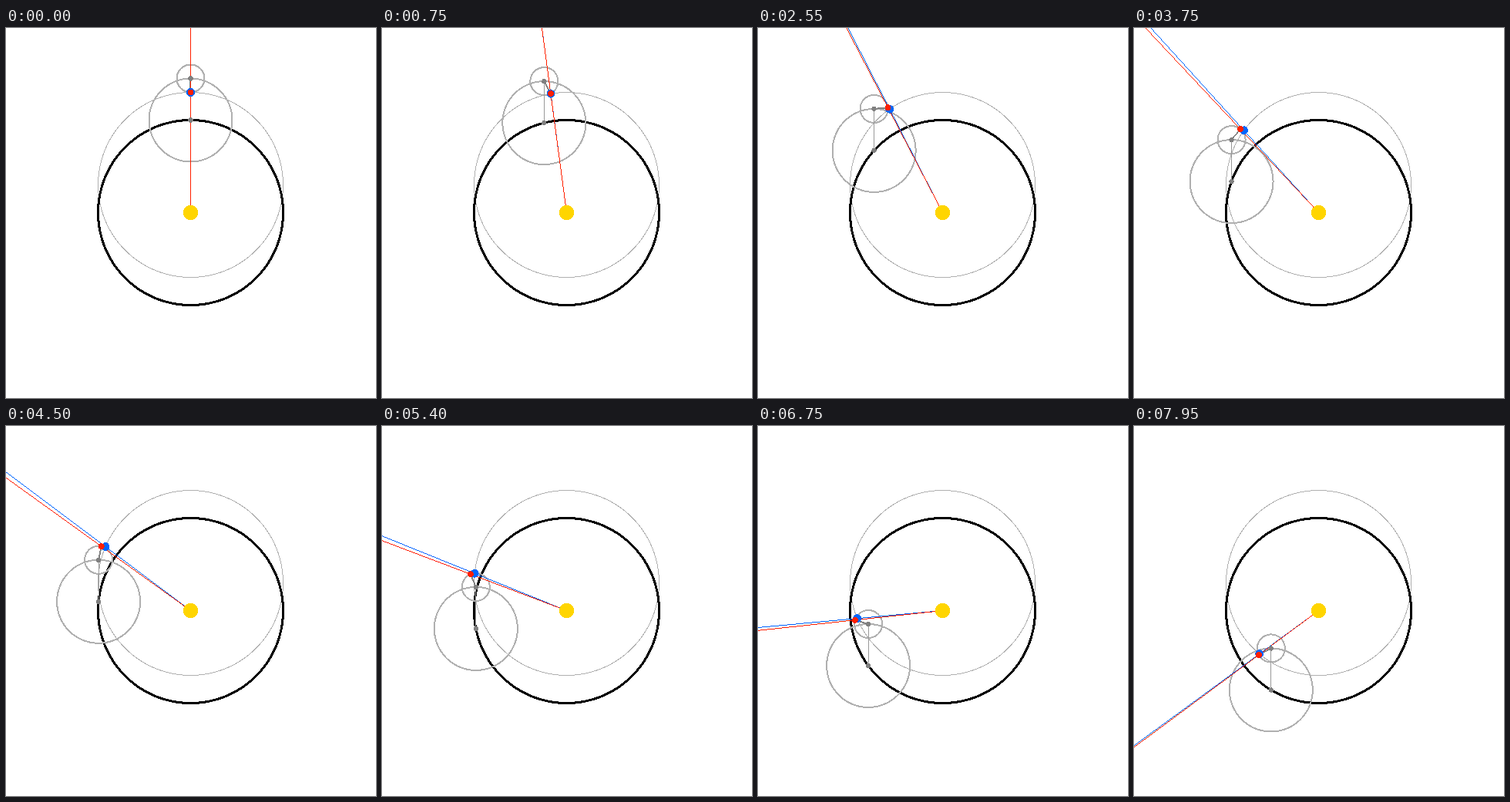
A matplotlib script for the animation above (8 s loop, 480 by 480 pixels).

```python
import numpy as np
import matplotlib.pyplot as plt
from matplotlib.animation import FuncAnimation
from matplotlib.colors import to_rgb

SIZE, DPI = 480, 96
SUN = np.array([239.5, 239.5])
R, ECC = 120, 36                   # deferent radius, eccentricity
R1, R2 = 1.5 * ECC, 0.5 * ECC      # epicycle radii
STEP = 2 * np.pi / 128
HOLD = 3                           # ticks per pose
TICKS, TICK_MS = 160, 50

RED, BLUE, GOLD = "#ff2000", "#0066ff", "#ffd500"
RING, ARM, HUB = "#b0b0b0", "#999999", "#808080"
UP = np.array([0, -1])

# Coordinates of the pixel centres, for hard-edged drawing.
X, Y = np.meshgrid(np.arange(SIZE) + 0.5, np.arange(SIZE) + 0.5)


def heading(angle):
    """Unit vector turned counterclockwise from straight up."""
    return np.array([-np.sin(angle), -np.cos(angle)])


def distance(center):
    return np.hypot(X - center[0], Y - center[1])


def disc(canvas, center, radius, color):
    canvas[distance(center) < radius] = to_rgb(color)


def ring(canvas, center, radius, color, width):
    offset = distance(center) - radius
    canvas[(offset >= -width / 2) & (offset < width / 2)] = to_rgb(color)


def segment(canvas, a, b, color, width=1):
    """Hard-edged line, its width measured across the steeper axis."""
    dx, dy = b - a
    px, py = X - a[0], Y - a[1]
    offset = (px * dy - py * dx) / max(abs(dx), abs(dy))
    along = (px * dx + py * dy) / (dx * dx + dy * dy)
    on_line = (offset >= -width / 2) & (offset < width / 2)
    canvas[on_line & (along >= 0) & (along <= 1)] = to_rgb(color)


def ray(canvas, planet, color):
    way = planet - SUN
    segment(canvas, SUN, SUN + 700 * way / np.hypot(*way), color)


def equant_planet(mean):
    """Point on the eccentric circle seen at a uniform angle from the equant."""
    reach = np.sqrt(R**2 - (ECC * np.sin(mean))**2) - ECC * np.cos(mean)
    return SUN + 2 * ECC * UP + reach * heading(mean)


backdrop = np.ones((SIZE, SIZE, 3))
ring(backdrop, SUN + ECC * UP, R, RING, 1)
ring(backdrop, SUN, R, "black", 3)


def paint(mean):
    c1 = SUN + R * heading(mean)
    c2 = c1 + R1 * UP
    red = c2 - R2 * heading(2 * mean)
    blue = equant_planet(mean)

    canvas = backdrop.copy()
    ring(canvas, c1, R1, RING, 2)
    ring(canvas, c2, R2, RING, 2)
    segment(canvas, c1, c2, ARM)
    segment(canvas, c2, red, HUB, 2)
    ray(canvas, blue, BLUE)
    ray(canvas, red, RED)
    disc(canvas, c1, 3.2, HUB)
    disc(canvas, c2, 3.2, HUB)
    disc(canvas, blue, 5.4, BLUE)
    disc(canvas, red, 4, RED)
    disc(canvas, SUN, 9.5, GOLD)
    return canvas


fig = plt.figure(figsize=(SIZE / DPI, SIZE / DPI), dpi=DPI, facecolor="white")
ax = fig.add_axes([0, 0, 1, 1])
ax.axis("off")
picture = ax.imshow(backdrop, aspect="auto", interpolation="nearest")


def update(tick):
    picture.set_data(paint(tick // HOLD * STEP))
    return [picture]


anim = FuncAnimation(fig, update, frames=TICKS, interval=TICK_MS,
                     repeat=True, repeat_delay=0, blit=False)
plt.show()
```
